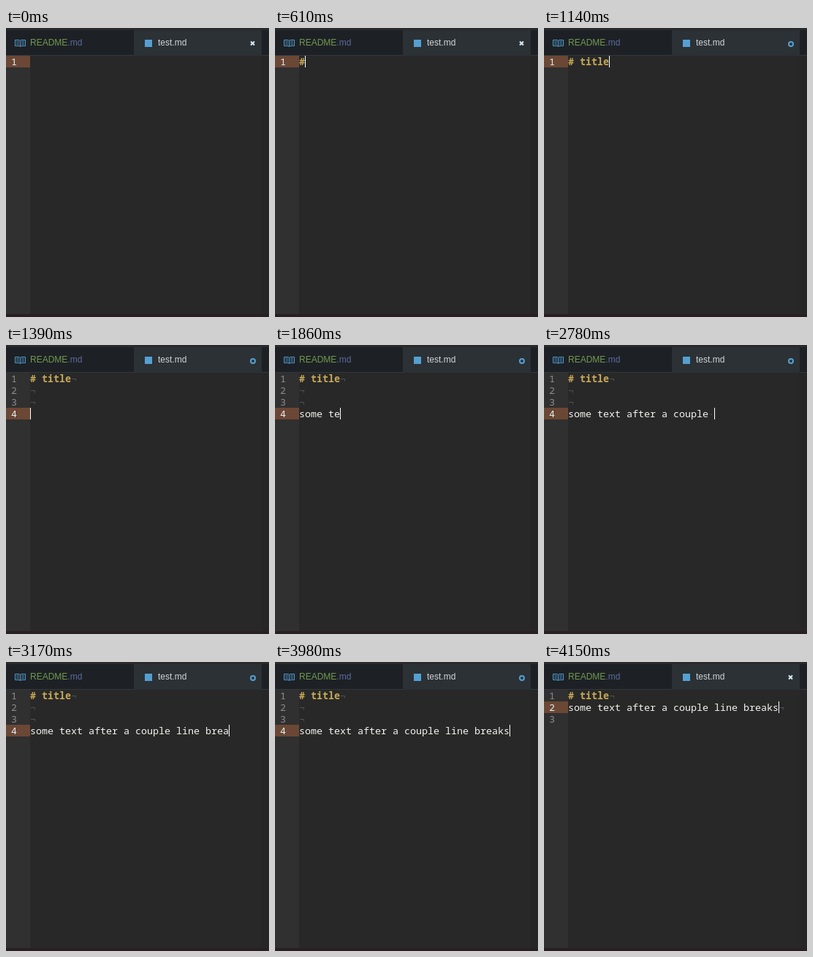
These frames come from a looping animation (360x396 px, 4950 ms). An HTML page:

```html
<!DOCTYPE html>
<html lang="en">
<head>
<meta charset="utf-8">
<title>Editor typing loop</title>
<style>
  html, body { margin: 0; width: 100%; height: 100%; overflow: hidden; background: #282828; }
  svg { display: block; width: 360px; height: 396px; }
  text { white-space: pre; }
  .tab { font: 12px "Liberation Sans", Arial, sans-serif; }
  .code { font: 13.333px "Noto Sans Mono", "DejaVu Sans Mono", monospace; }
  .title { font-weight: 700; fill: #c8aa58; }
  .body { fill: #f4f4f2; }
  .mark { fill: #50575a; }
  .num { fill: #8c8c8c; }
  .num.on { fill: #e6eef2; }
</style>
</head>
<body>
<svg viewBox="0 0 360 396">
  <rect width="360" height="396" fill="#282828"/>
  <rect y="38" width="33" height="354" fill="#303030"/>
  <rect x="350" y="38" width="10" height="354" fill="#262626"/>
  <rect width="360" height="38" fill="#1d2125"/>
  <rect x="175" y="3" width="175" height="35" fill="#2b3135"/>
  <rect width="360" height="3" fill="#2b2a2b"/>
  <rect y="37" width="175" height="1" fill="#33383b"/>
  <rect x="350" y="37" width="10" height="1" fill="#33383b"/>
  <rect y="392" width="360" height="4" fill="#291f22"/>

  <g fill="none" stroke="#519bd0">
    <path d="M12.5 16.5H18L19.5 17.5L21 16.5H26.5V24.5H21L19.5 25.5L18 24.5H12.5ZM19.5 17.5V25"/>
    <path d="M14 18.5h4M14 20.5h4M14 22.5h4M21 18.5h4M21 20.5h4M21 22.5h4" stroke-opacity=".75"/>
  </g>
  <text class="tab" x="33" y="24" fill="#71994f">README<tspan fill="#5c6a9c">.md</tspan></text>
  <rect x="190" y="16" width="10" height="10" fill="#549fd2"/>
  <text class="tab" x="208" y="24" fill="#d3d7d9">test.md</text>
  <path id="close" d="M335 18.5l5 5m0-5l-5 5" stroke="#d9edf5" stroke-width="2" fill="none"/>
  <circle id="dirty" cx="338" cy="22" r="3" stroke="#559fd3" stroke-width="2" fill="none"/>

  <rect id="active" width="33" height="16" fill="#6b4735"/>
  <g id="lines" class="code"></g>
  <path id="spell" d="M273 102.5H305" stroke="#b04a48" stroke-dasharray="2 1"/>
  <rect id="caret" width="1" height="16" fill="#fff"/>
</svg>
<script>
const LOOP = 4950, LEFT = 33, TOP = 38, COL = 8, ROW = 16;
const TITLE = "# title";
const BODY = "some text after a couple line breaks";
const $ = id => document.getElementById(id);

// [time, characters typed]
const titleKeys = [[0, 0], [500, 1], [930, 3], [990, 5], [1140, 7]];
const bodyKeys = [
  [0, 0], [1460, 5], [1860, 7], [1910, 10], [1970, 13], [2110, 15], [2160, 18],
  [2430, 20], [2490, 22], [2780, 25], [2840, 30], [3170, 34], [3620, 35], [3680, 36]
];
const lineKeys = [[0, 1], [1190, 2], [1390, 4]];
const caretKeys = [[0, 0], [230, 0.5], [280, 1], [3810, 0], [3980, 1]];

const at = (keys, t) => keys.reduce((v, [time, next]) => t >= time ? next : v, 0);
const between = (t, a, b) => t >= a && t < b;
const show = (id, on) => $(id).setAttribute("visibility", on ? "visible" : "hidden");

function stateAt(t) {
  const title = TITLE.slice(0, at(titleKeys, t));
  const body = BODY.slice(0, at(bodyKeys, t));
  if (t >= 4150) return { lines: [title, body, ""], row: 1 };
  const lines = Array(at(lineKeys, t)).fill("");
  lines[0] = title;
  if (lines.length === 4) lines[3] = body;
  return { lines, row: lines.length - 1 };
}

function label(cls, col, y, str) {
  return `<text class="${cls}" x="${LEFT + col * COL}" y="${y}">${str}</text>`;
}

function lineMarkup(str, i, lines, row) {
  const y = TOP + i * ROW + 13;
  const last = i === lines.length - 1;
  const end = str.length;
  let out = `<text class="num${i === row ? " on" : ""}" x="7" y="${y}">${i + 1}</text>`;
  out += label(i ? "body" : "title", 0, y, str);
  if (str.endsWith(" ")) out += label("mark", end - 1, y, "·");
  if (!last) out += label("mark", end, y, "¬");
  return out;
}

let drawn = "";
function render(t) {
  const { lines, row } = stateAt(t);
  const markup = lines.map((s, i) => lineMarkup(s, i, lines, row)).join("");
  if (markup !== drawn) $("lines").innerHTML = drawn = markup;

  const y = TOP + row * ROW;
  $("active").setAttribute("y", y);
  $("caret").setAttribute("x", LEFT + lines[row].length * COL);
  $("caret").setAttribute("y", y);
  $("caret").setAttribute("opacity", at(caretKeys, t));

  const dirty = between(t, 930, 4150);
  show("dirty", dirty);
  show("close", !dirty);
  show("spell", between(t, 3430, 3740));
}

const start = performance.now();
function tick() {
  render((performance.now() - start) % LOOP);
  requestAnimationFrame(tick);
}
tick();
</script>
</body>
</html>
```
